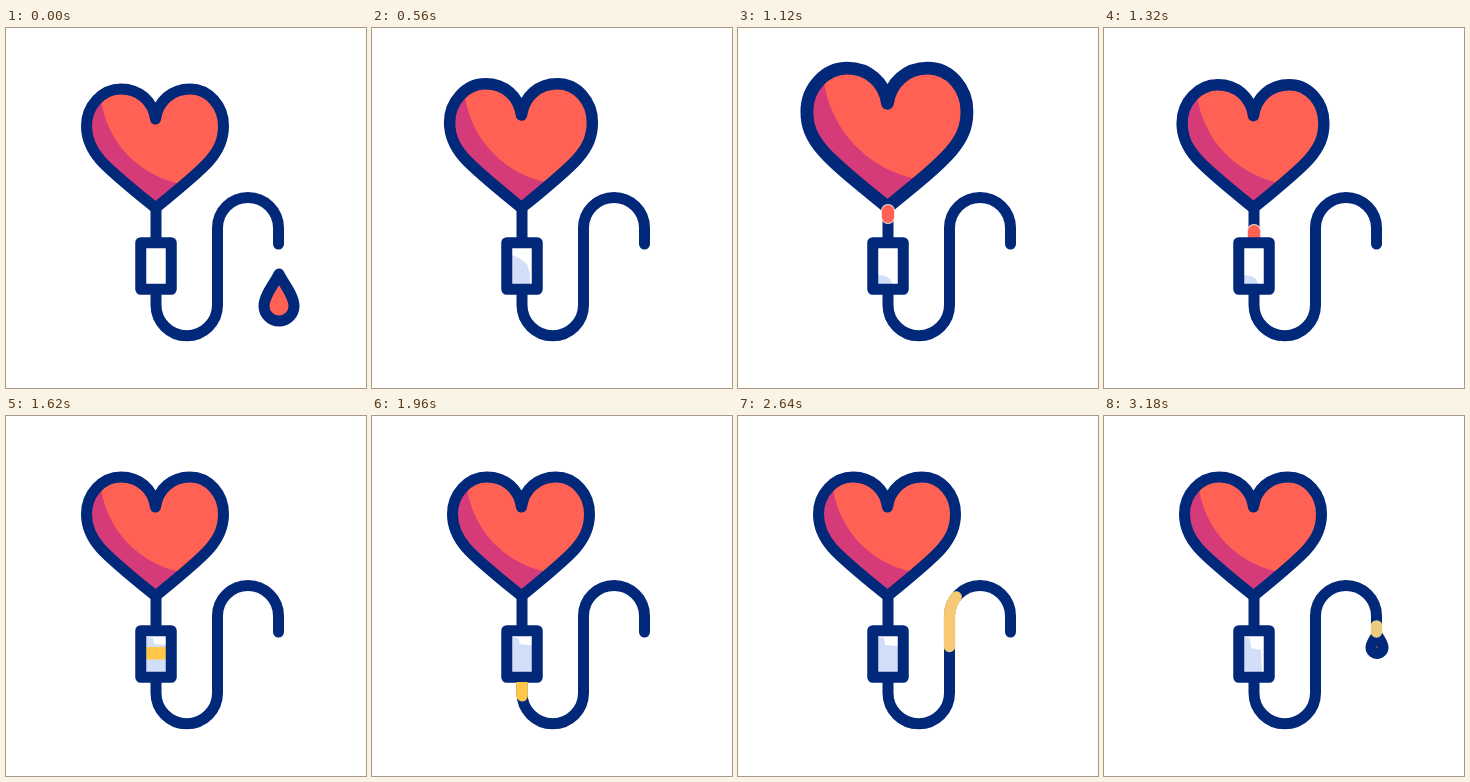
Write an HTML page with a canvas that moves like this. It is 360 by 360 pixels and loops after 3.2 s.

```html
<!DOCTYPE html>
<html lang="en">
<head>
<meta charset="utf-8">
<title>Blood donation</title>
<style>
html, body { margin: 0; width: 100%; height: 100%; overflow: hidden; background: #fff; }
canvas { display: block; width: 360px; height: 360px; }
</style>
</head>
<body>
<canvas id="stage" width="360" height="360"></canvas>
<script>
const ctx = document.getElementById('stage').getContext('2d');
const LOOP = 3200;
const NAVY = '#02287a', RED = '#ff6254', PINK = '#d63b79', LILAC = '#d3def8';

const heart = new Path2D('M149.5 91C147 73 133 61 115 61C96 61 80.5 78 80.5 98C80.5 125 98 138 149.5 180C201 138 217.5 125 217.5 98C217.5 78 203 61 184 61C166 61 152 73 149.5 91Z');
const shade = new Path2D('M60 60L94 60C95 105 126 146 175 156L150 200L60 200Z');
const drop = new Path2D('M0 -31C-4 -22 -15 -10 -15 1A15 15 0 0 0 15 1C15 -10 4 -22 0 -31Z');
const tube = new Path2D('M150 261V277A30.75 30.75 0 0 0 211.5 277V200A30.5 30.5 0 0 1 272.5 200V216');
const TUBE_START = 76;

const clamp = x => Math.max(0, Math.min(1, x));
const smooth = x => (x = clamp(x), x * x * (3 - 2 * x));
const mix = (a, b, u) => a + (b - a) * u;

// Linear interpolation over [time, value] pairs; values may be arrays.
function track(keys, t) {
  if (t <= keys[0][0]) return keys[0][1];
  for (let i = 1; i < keys.length; i++) {
    const [t0, a] = keys[i - 1], [t1, b] = keys[i];
    if (t <= t1) {
      const u = (t - t0) / (t1 - t0);
      return Array.isArray(a) ? a.map((v, j) => mix(v, b[j], u)) : mix(a, b, u);
    }
  }
  return keys[keys.length - 1][1];
}

const tailKeys = [[2000, 70], [2280, 127], [2640, 235], [3180, 371]];
const headKeys = [[1860, 70], [2280, 174], [2640, 286], [2980, 378]];
const tintKeys = [[2280, [255, 198, 73]], [2640, [246, 202, 116]], [3180, [236, 205, 128]]];
const pillTop = [[1060, 177], [1120, 177], [1500, 215]];
const pillEnd = [[1060, 180], [1120, 195], [1400, 222]];
const bandTop = [[1540, 220], [1620, 231], [1860, 256]];
const bandEnd = [[1440, 220], [1620, 243.5], [1740, 256]];

// Outline of the tinted glass area, as x, y pairs.
const glassKeys = [
  [220, [140, 255, 147, 255, 155, 255, 158, 255, 158, 256]],
  [560, [140, 227, 147, 230, 155, 236, 158, 246, 158, 256]],
  [1120, [140, 247, 147, 248, 152, 251, 154, 255, 154, 256]],
  [1320, [140, 247, 147, 248, 152, 251, 154, 255, 154, 256]],
  [1620, [140, 221, 147, 222, 148, 228, 160, 229, 160, 256]],
  [2640, [140, 221, 146, 222, 147, 229, 160, 230, 160, 256]],
  [3180, [140, 221, 146, 222, 147, 232, 157, 234, 158, 256]]
];

function stroke(path, color = NAVY, width = 11) {
  ctx.strokeStyle = color;
  ctx.lineWidth = width;
  ctx.stroke(path);
}

function drawTube(t) {
  stroke(new Path2D('M150 180V215'));
  stroke(tube);
}

function drawHeart(t) {
  const beat = t < 1015 ? smooth((t - 370) / 645) : smooth((1430 - t) / 415);
  const k = 1 + 0.2 * beat;
  ctx.save();
  ctx.translate(149.5, 185);
  ctx.scale(k, k);
  ctx.translate(-149.5, -185);
  ctx.fillStyle = RED;
  ctx.fill(heart);
  ctx.save();
  ctx.clip(heart);
  ctx.fillStyle = PINK;
  ctx.fill(shade);
  ctx.restore();
  stroke(heart);
  ctx.restore();
}

function drawPill(t) {
  if (t < 1060 || t > 1500) return;
  const top = track(pillTop, t) + 6, end = Math.max(top + 0.1, track(pillEnd, t) - 6);
  const line = new Path2D(`M150 ${top}V${end}`);
  stroke(line, '#f6dcd9', 14);
  stroke(line, RED, 12);
}

function drawBox(t) {
  ctx.fillStyle = '#fff';
  ctx.fillRect(135, 215, 30, 46);
  if (t > 220) {
    const p = track(glassKeys, t);
    ctx.fillStyle = LILAC;
    ctx.beginPath();
    ctx.moveTo(140, 256);
    for (let i = 0; i < p.length; i += 2) ctx.lineTo(p[i], p[i + 1]);
    ctx.fill();
  }
  const top = track(bandTop, t), end = track(bandEnd, t);
  if (end > top) {
    ctx.fillStyle = '#ffc649';
    ctx.fillRect(140, top, 20, end - top);
  }
  stroke(new Path2D('M134.75 214.75H165.25V261.25H134.75Z'));
}

function drawFlow(t) {
  if (t < 1880) return;
  const tail = track(tailKeys, t) - TUBE_START, head = track(headKeys, t) - TUBE_START;
  if (head <= 0) return;
  const from = Math.max(0, tail);
  ctx.save();
  // Keep the round end out of the box.
  ctx.beginPath();
  ctx.rect(0, 0, 360, 209);
  ctx.rect(172, 209, 188, 151);
  ctx.rect(0, 266, 172, 94);
  ctx.clip();
  ctx.setLineDash([0, from, Math.max(0.1, head - from), 1000]);
  ctx.lineCap = 'butt';
  const tint = `rgb(${track(tintKeys, t).map(Math.round)})`;
  ctx.lineCap = 'round';
  ctx.setLineDash([Math.max(0.1, head - from), 1000]);
  ctx.lineDashOffset = -from;
  stroke(tube, tint, 11.5);
  ctx.restore();
}

function drawDrop(x, y, k, alpha) {
  const path = new Path2D();
  path.addPath(drop, new DOMMatrix([k, 0, 0, k, x, y]));
  ctx.globalAlpha = alpha;
  ctx.fillStyle = RED;
  ctx.fill(path);
  stroke(path);
  ctx.globalAlpha = 1;
}

function draw(t) {
  ctx.fillStyle = '#fff';
  ctx.fillRect(0, 0, 360, 360);
  ctx.lineCap = ctx.lineJoin = 'round';
  drawTube(t);
  drawHeart(t);
  drawPill(t);
  drawBox(t);
  if (t < 480) {
    const u = clamp((t - 220) / 260);
    drawDrop(273, 277 + 20 * u, 1, 1 - u * u);
  } else if (t > 3080) {
    const k = 0.4 * (t - 3080) / 100;
    drawDrop(273, 215 + 40 * k, k, 1);
  }
  drawFlow(t);
}

function frame() {
  const t = performance.now() % LOOP;
  draw(t < 220 ? 0 : Math.floor(t / 20) * 20);
  requestAnimationFrame(frame);
}
frame();
</script>
</body>
</html>
```
